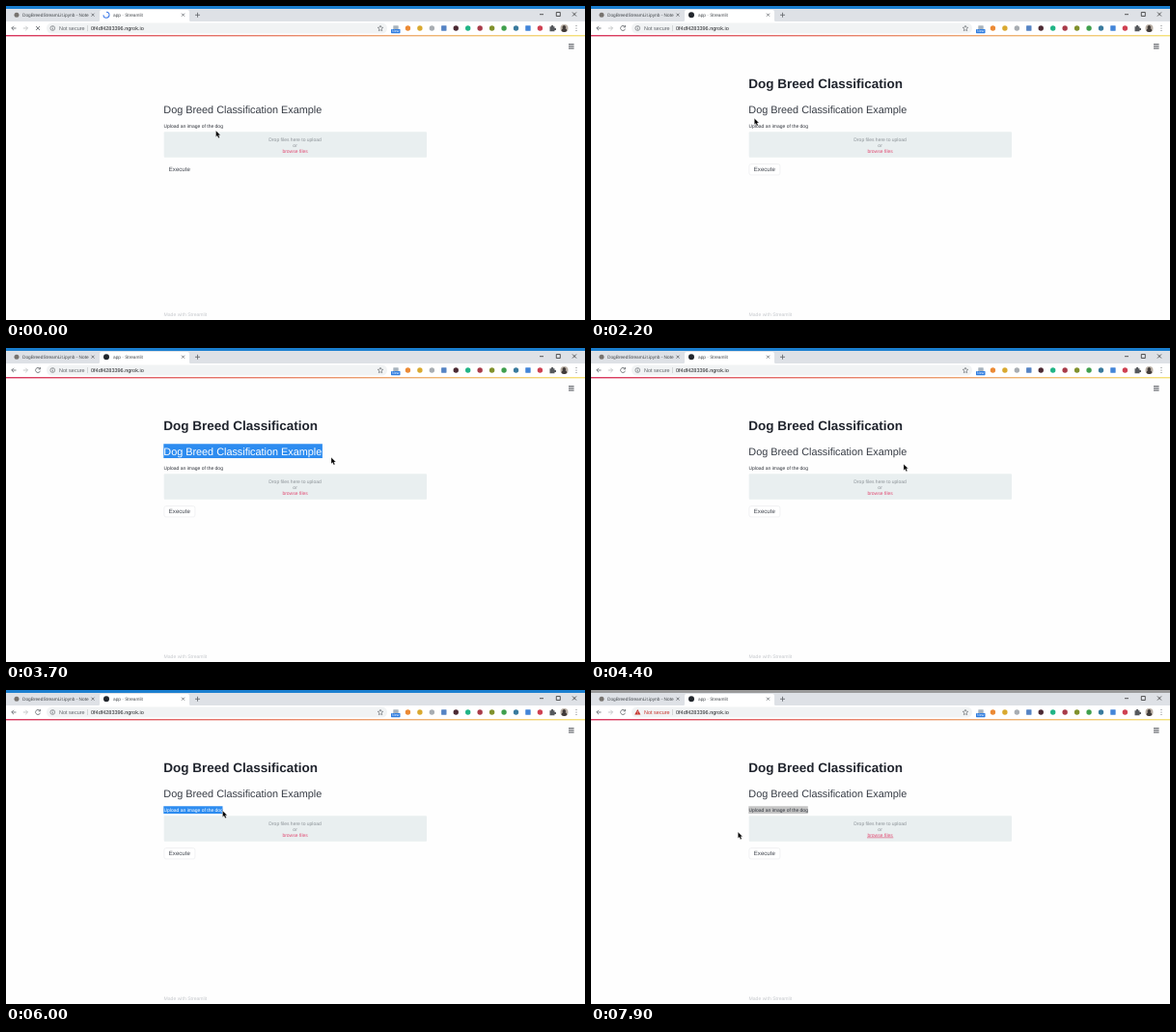
An HTML page that plays this animation: 600x325 px, repeating every 8 s.

```html
<!DOCTYPE html>
<html lang="en">
<head>
<meta charset="utf-8">
<title>Dog Breed Classification</title>
<style>
html, body { margin: 0; width: 100%; height: 100%; overflow: hidden; background: #fefefe; }
svg { display: block; width: 600px; height: 325px; font-family: "Liberation Sans", Arial, sans-serif; text-rendering: geometricPrecision; }
text { white-space: pre; }
.line { fill: none; stroke: #5f6368; stroke-width: .8; }
.tab { font-size: 4.75px; fill: #45494d; }
.url { font-size: 5.5px; }
.small { font-size: 5px; }
.mid { text-anchor: middle; }
.head { font-size: 10.85px; }
</style>
</head>
<body>
<svg viewBox="0 0 600 325">
  <defs>
    <linearGradient id="warm">
      <stop stop-color="#d9365f"/><stop offset=".5" stop-color="#e98a6c"/><stop offset="1" stop-color="#f5e27a"/>
    </linearGradient>
    <clipPath id="headClip"><rect id="headBox" x="163.3" y="99.3" width="0" height="14.8"/></clipPath>
    <clipPath id="labelClip"><rect id="labelBox" x="163.3" y="120.3" width="0" height="7.6"/></clipPath>
  </defs>

  <!-- browser frame -->
  <rect width="600" height="17" fill="#dee1e6"/>
  <rect id="bar" width="600" height="3" fill="#1b7fd0"/>
  <path d="M95 16.5q2 0 2-2V6q0-2 2-2h89q2 0 2 2v8.500q0 2 2 2z" fill="#fff"/>
  <rect y="16" width="600" height="14" fill="#fff"/>
  <circle cx="11" cy="9.300" r="2.500" fill="#77736f"/>
  <text class="tab" x="17" y="11">DogBreedStreamLit.ipynb - Note</text>
  <text class="tab" x="111" y="11">app · Streamlit</text>
  <circle id="icon" cx="104" cy="9.300" r="3" fill="#22262c"/>
  <path id="spinner" d="M104 6.300a3 3 0 1 1-3 3" fill="none" stroke="#3b78e7" stroke-width="1"/>
  <path class="line" d="M88.500 7.700l3 3m0-3l-3 3M182 7.700l3 3m0-3l-3 3M196 9.300h5M198.500 6.800v5"/>
  <path class="line" style="stroke:#333" d="M553 8.700h4M570.300 6.500h4v4h-4zM587 6.500l4 4m0-4l-4 4"/>
  <rect x="42" y="17.500" width="353" height="11" rx="5.500" fill="#f1f3f4"/>
  <path class="line" d="M10.500 23H5.800m2.200-2.200L5.800 23l2.200 2.200"/>
  <path class="line" style="stroke:#b9bbbd" d="M17.800 23h4.700m-2.200-2.200l2.200 2.200-2.200 2.200"/>
  <path id="reload" class="line" d="M35 21.300a2.500 2.500 0 1 0 .5 2.400M35.600 19.900v2h-2"/>
  <path id="stop" class="line" d="M31 21l4 4m0-4l-4 4"/>
  <g id="info"><circle class="line" cx="48.300" cy="23" r="2.400" style="stroke-width:.6"/><path class="line" d="M48.300 21.400v.7m0 .6v1.800"/></g>
  <g id="warn"><path d="M48.300 20.100l3.100 5.300h-6.200z" fill="#c5332b"/><path d="M48.300 22v1.600m0 .5v.6" stroke="#fff" stroke-width=".6"/></g>
  <text id="secure" class="url" x="55" y="25">Not secure</text>
  <path d="M84.500 20v6" stroke="#b5b8bb" stroke-width=".5"/>
  <text class="url" x="88" y="25" fill="#202124">0f4df4283396.ngrok.io</text>
  <path class="line" style="stroke-width:.6" d="M388 20.200l.8 1.900 2 .2-1.500 1.400.4 2-1.700-1-1.700 1 .4-2-1.500-1.400 2-.2z"/>
  <g id="extensions"></g>
  <rect x="399" y="24" width="9.500" height="4.200" rx=".6" fill="#2f7de0"/>
  <text class="mid" x="403.700" y="27.400" font-size="3.600" fill="#fff">New</text>
  <path d="M563.500 21.300h1.600a1.100 1.100 0 1 1 2 0h1.400v1.600a1.100 1.100 0 1 1 0 2v1.300h-5z" fill="#55585c"/>
  <circle cx="578.500" cy="23" r="4" fill="#b9afa5"/>
  <path d="M575.600 25.800q0-2.200 1.500-2.600a1.800 1.800 0 1 1 2.500 0q1.700.4 1.700 2.600a4 4 0 0 1-5.700 0z" fill="#403a38"/>
  <path d="M591 20.500h.01M591 23h.01M591 25.500h.01" stroke="#5f6368" stroke-width="1.100" stroke-linecap="round"/>

  <!-- page -->
  <rect y="30" width="600" height="1.400" fill="url(#warm)"/>
  <path d="M583 39.700h5.600m-5.600 2.100h5.600m-5.600 2.100h5.600" stroke="#363a42" stroke-width=".9"/>
  <text id="title" x="163.300" y="84.700" font-size="13.500" font-weight="700" fill="#20242d">Dog Breed Classification</text>
  <text class="head" x="163.300" y="110.800" fill="#363b44">Dog Breed Classification Example</text>
  <g clip-path="url(#headClip)">
    <rect x="163" y="99" width="166" height="16" fill="#2d8cf0"/>
    <text class="head" x="163.300" y="110.800" fill="#fff">Dog Breed Classification Example</text>
  </g>
  <text class="small" x="163.500" y="125.800" fill="#30343c">Upload an image of the dog</text>
  <g clip-path="url(#labelClip)">
    <rect id="labelFill" x="163" y="120" width="62" height="8"/>
    <text id="labelText" class="small" x="163.500" y="125.800">Upload an image of the dog</text>
  </g>
  <rect x="163.700" y="130.200" width="272.300" height="26.600" rx="1" fill="#e9eff0"/>
  <g class="small mid">
    <text x="299.600" y="139.500" fill="#8b9196">Drop files here to upload</text>
    <text x="299.600" y="145.700" fill="#8b9196">or</text>
    <text x="299.600" y="151.900" fill="#e04a72">browse files</text>
  </g>
  <path id="underline" d="M286 152.800h27.300" stroke="#d8446b" stroke-width=".6"/>
  <rect id="button" x="163.900" y="163.600" width="32" height="11.300" rx="2" fill="#fff" stroke="#e8e9eb" stroke-width=".6"/>
  <text x="168.800" y="171.300" font-size="6.100" fill="#3a3f48">Execute</text>
  <text x="163.500" y="320.600" font-size="5.100" fill="#c6c9cd">Made with Streamlit</text>
  <path id="cursor" d="M0 0v6.500l1.500-1.300 1.100 2.500 1.300-.6-1.100-2.400h2z" fill="#000" stroke="#fff" stroke-width=".3"/>
</svg>
<script>
const $ = id => document.getElementById(id);
const LOOP = 8000;
const BLUE = "#2d8cf0";

// time, x, y of the pointer tip
const path = [
  [0, 217.5, 129], [900, 270.5, 153], [1500, 215, 135], [2200, 169.3, 116.3],
  [2400, 163.5, 108], [3400, 331, 108], [3700, 337, 113.3], [4300, 330, 120],
  [5200, 157, 124], [5400, 163.3, 124], [6100, 228, 125], [6600, 292, 150],
  [6800, 293.3, 151], [7100, 293.3, 151], [7900, 152.3, 147], [8000, 152.3, 147]
];

// toolbar icons, evenly spaced: "s" marks a square
const icons = ["#a9b4be s", "#ec8a35", "#d9a92f", "#a8adb2", "#5583c4 s", "#4b2932", "#20b486",
  "#a83a48", "#80912c", "#3f9f4c", "#397a9d", "#4285d8 s", "#cf4051"];
$("extensions").innerHTML = icons.map((icon, i) => {
  const [color, square] = icon.split(" ");
  const x = 404 + i * 12.45;
  return `<rect x="${x - 2.7}" y="20.3" width="5.4" height="5.4" rx="${square ? 0.4 : 2.7}" fill="${color}"/>`;
}).join("");

const show = (id, on) => $(id).style.display = on ? "" : "none";
const set = (id, name, value) => $(id).setAttribute(name, value);
const clamp = (v, max) => Math.max(0, Math.min(max, v));

function pointer(t) {
  const i = path.findIndex(p => p[0] > t);
  const [t0, x0, y0] = path[i - 1], [t1, x1, y1] = path[i];
  const u = (t - t0) / (t1 - t0), e = u * u * (3 - 2 * u);
  return [x0 + (x1 - x0) * e, y0 + (y1 - y0) * e];
}

// selected width while dragging, held until the next click
function selection(t, x, start, done, end, full) {
  if (t < start || t >= end) return 0;
  return t >= done ? full : clamp(x - 163.3, full);
}

function draw(t) {
  const [x, y] = pointer(t);
  const loading = t < 400, ready = t >= 300, warned = t >= 6600, blurred = t >= 7100;
  set("cursor", "transform", `translate(${x} ${y})`);
  show("title", ready);
  show("button", ready);
  show("spinner", loading);
  show("stop", loading);
  show("icon", !loading);
  show("reload", !loading);
  set("spinner", "transform", `rotate(${t * 0.5} 104 9.3)`);
  show("info", !warned);
  show("warn", warned);
  set("secure", "fill", warned ? "#c5332b" : "#5f6368");
  show("underline", warned);
  set("bar", "fill", blurred ? "#9a9a9a" : "#1b7fd0");
  set("labelFill", "fill", blurred ? "#c4c4c4" : BLUE);
  set("labelText", "fill", blurred ? "#30343c" : "#fff");
  set("headBox", "width", selection(t, x, 2400, 3400, 4300, 164.6));
  set("labelBox", "width", selection(t, x, 5400, 6100, LOOP, 61.5));
}

const begin = performance.now();
function tick() {
  draw((performance.now() - begin) % LOOP);
  requestAnimationFrame(tick);
}
tick();
</script>
</body>
</html>
```
